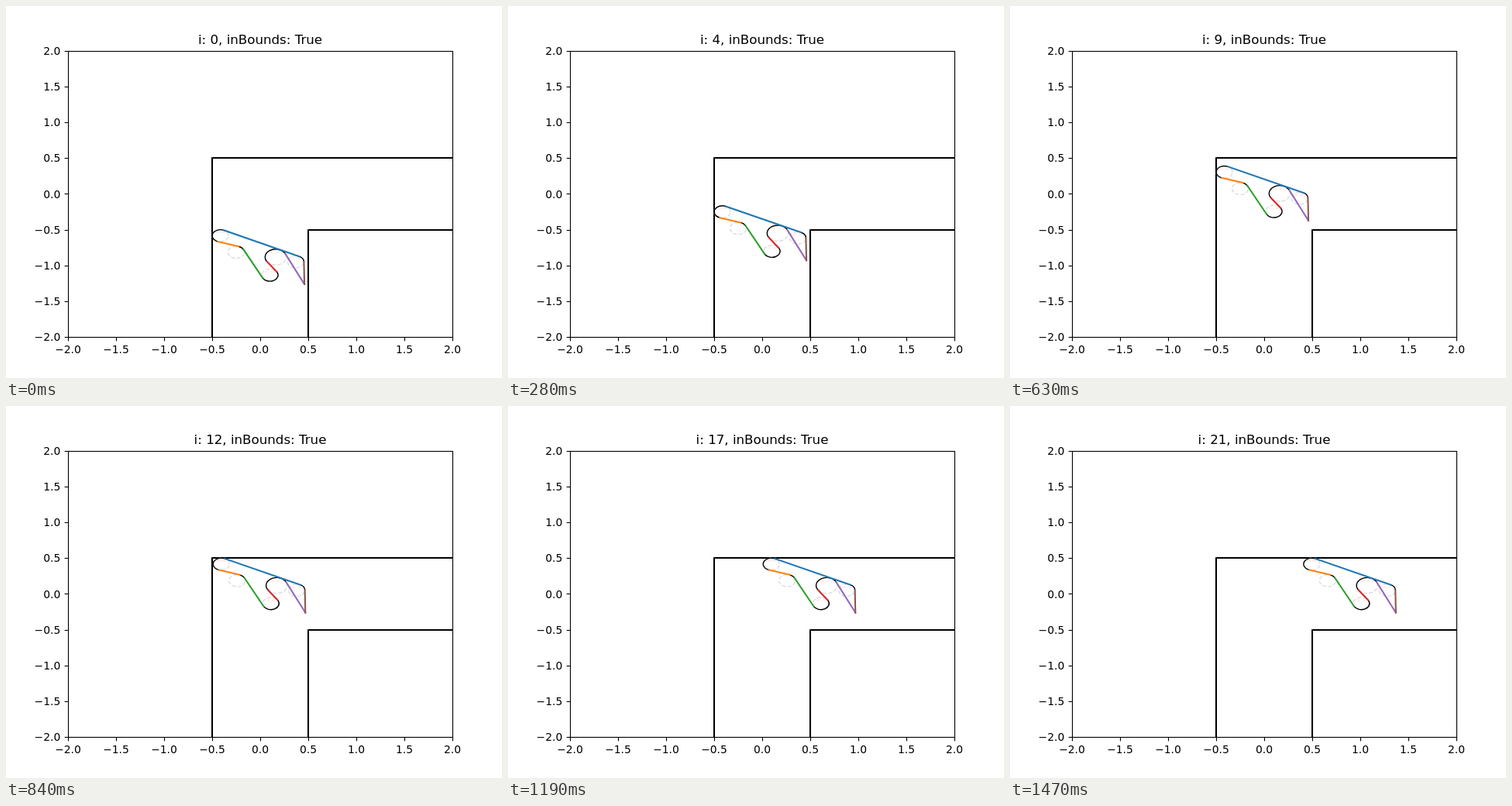
These frames come from a looping animation (640 by 480 pixels, 1.54 s). An HTML page with a canvas:

```html
<!DOCTYPE html>
<html lang="en">
<head>
<meta charset="utf-8">
<title>Corridor plot</title>
<style>
  html, body { margin: 0; width: 100%; height: 100%; overflow: hidden; background: #fff; }
  canvas { display: block; }
</style>
</head>
<body>
<canvas id="plot" width="640" height="480"></canvas>
<script>
const ctx = document.getElementById('plot').getContext('2d');
const STEP = 70, COUNT = 22;
const SX = 124, SY = 92.4;
const px = x => 328 + SX * x;
const py = y => 242.4 - SY * y;
const crisp = v => Math.floor(v + 0.5) + 0.5;
const THIN = 1.11, ARC = 1.39, THICK = 2.08;

// Corner circles of the moving shape, in plot units
const circle = (x, y, r) => ({ x, y, r });
const A = circle(-0.415, -0.585, 0.085);
const B = circle(-0.25, -0.815, 0.085);
const C = circle(0.101, -1.135, 0.085);
const D = circle(0.161, -0.883, 0.11);
const E = circle(0.37, -0.95, 0.085);
const TIP = circle(0.46, -1.262, 0);

// Tangent from a to b; side +1 touches left of the heading, -1 right
function tangent(a, b, sideA, sideB) {
  const dx = b.x - a.x, dy = b.y - a.y, d2 = dx * dx + dy * dy;
  const ra = sideA * a.r, rb = sideB * b.r, k = ra - rb;
  const h = Math.sqrt(d2 - k * k);
  const nx = (dx * k - dy * h) / d2, ny = (dy * k + dx * h) / d2;
  return [{ x: a.x + ra * nx, y: a.y + ra * ny }, { x: b.x + rb * nx, y: b.y + rb * ny }];
}

const blue = tangent(A, E, 1, 1);
const orange = tangent(A, B, -1, 1);
const green = tangent(B, C, 1, -1);
const red = tangent(C, D, -1, 1);
const purple = tangent(D, TIP, 1, 1);
const brown = tangent(TIP, E, -1, -1);

const edges = [
  [blue, '#1f77b4'], [orange, '#ff7f0e'], [green, '#2ca02c'],
  [red, '#d62728'], [purple, '#9467bd'], [brown, '#8c564b']
];
const arcs = [
  [A, blue[0], orange[0], false],
  [B, orange[1], green[0], true],
  [C, green[1], red[0], false],
  [D, red[1], purple[0], true],
  [E, brown[1], blue[1], false]
];

function stroke(color, width, dash = []) {
  ctx.strokeStyle = color;
  ctx.lineWidth = width;
  ctx.setLineDash(dash);
  ctx.stroke();
}

function line(points, color, width, dash) {
  ctx.beginPath();
  points.forEach(([x, y]) => ctx.lineTo(x, y));
  stroke(color, width, dash);
}

function arc(c, from, to, clockwise, ox, oy, color, width, dash) {
  ctx.save();
  ctx.translate(px(c.x + ox), py(c.y + oy));
  ctx.scale(SX, -SY);
  ctx.beginPath();
  ctx.arc(0, 0, c.r, from, to, clockwise);
  ctx.restore();
  stroke(color, width, dash);
}

// Up the corridor, then right
function offset(i) {
  if (i < 12) return [0, Math.min(1, Math.max(0, i - 1) / 9)];
  return [0.01 + (i - 12) * 0.1, 1];
}

function drawShape(ox, oy) {
  ctx.lineCap = 'butt';
  for (const c of [A, B, C, D, E]) {
    arc(c, 0, 2 * Math.PI, false, ox, oy, '#dcdcdc', ARC, [5.1, 2.2]);
    if (c === B) continue;
    const y = py(c.y + oy + c.r * 0.55), w = c.r * 0.6;
    line([[px(c.x + ox - w), y], [px(c.x + ox + w), y]], 'rgba(255,0,0,0.1)', ARC, [5.1, 2.2]);
  }
  const angle = (c, p) => Math.atan2(p.y - c.y, p.x - c.x);
  for (const [c, p, q, cw] of arcs)
    arc(c, angle(c, p), angle(c, q), cw, ox, oy, '#000', ARC);
  ctx.lineCap = 'square';
  for (const [pts, color] of edges)
    line(pts.map(p => [px(p.x + ox), py(p.y + oy)]), color, THICK);
}

function drawAxes() {
  ctx.lineCap = 'butt';
  ctx.fillStyle = '#000';
  ctx.font = '13.89px "DejaVu Sans", sans-serif';
  for (let v = -2; v <= 2; v += 0.5) {
    const x = crisp(px(v)), y = crisp(py(v));
    const label = v.toFixed(1).replace('-', '\u2212');
    line([[x, 427.5], [x, 432.4]], '#000', THIN);
    line([[75.6, y], [80.5, y]], '#000', THIN);
    ctx.textAlign = 'center';
    ctx.fillText(label, px(v), 448);
    ctx.textAlign = 'right';
    ctx.fillText(label, 70.3, Math.round(py(v) + 5.2));
  }
  ctx.lineCap = 'square';
  ctx.strokeStyle = '#000';
  ctx.lineWidth = THIN;
  ctx.strokeRect(80.5, 58.5, 496, 369);
}

function draw(i) {
  ctx.fillStyle = '#fff';
  ctx.fillRect(0, 0, 640, 480);
  ctx.save();
  ctx.beginPath();
  ctx.rect(80, 58, 496, 369);
  ctx.clip();
  ctx.lineJoin = 'round';
  line([[266, 430], [266, 196], [580, 196]], '#000', THICK);
  line([[390, 430], [390, 289], [580, 289]], '#000', THICK);
  drawShape(...offset(i));
  ctx.restore();
  ctx.lineJoin = 'miter';
  drawAxes();
  ctx.font = '16.67px "DejaVu Sans", sans-serif';
  ctx.textAlign = 'center';
  ctx.fillText(`i: ${i}, inBounds: True`, 328, 49);
}

const start = performance.now();
function tick() {
  draw(Math.floor((performance.now() - start) / STEP) % COUNT);
  requestAnimationFrame(tick);
}
tick();
</script>
</body>
</html>
```
